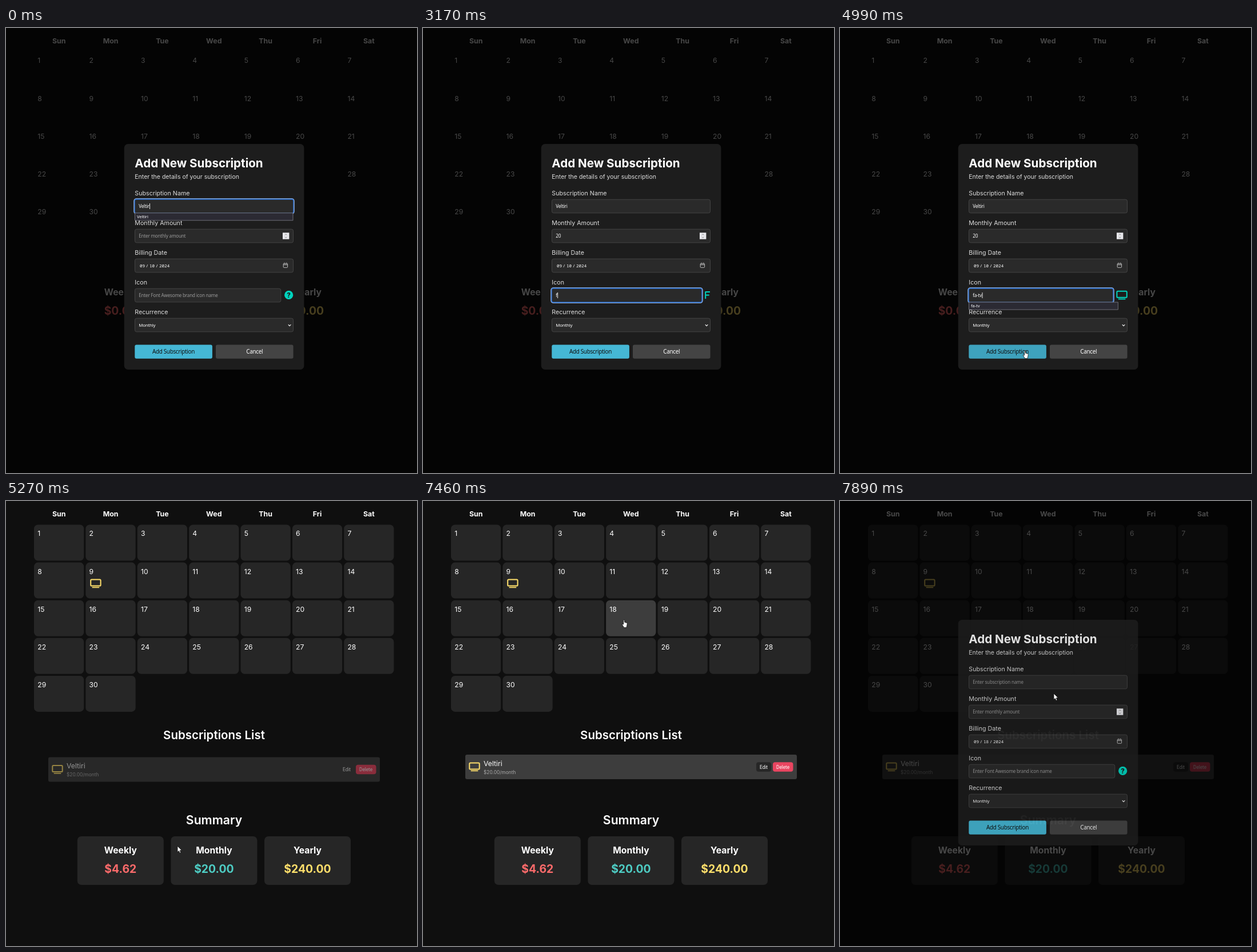
Write an HTML page with a canvas that moves like this. It is 719 px wide and 779 px high and loops after 8000 ms.

```html
<!DOCTYPE html>
<html lang="en">
<head>
<meta charset="utf-8">
<title>Subscription calendar</title>
<style>
html, body { margin: 0; width: 100%; height: 100%; overflow: hidden; background: #0f0f0f; }
canvas { display: block; }
</style>
</head>
<body>
<canvas id="stage" width="719" height="779"></canvas>
<script>
const W = 719, H = 779, LOOP = 8000;
const SERVICE = 'Veltiri';
const UI = 'Inter, sans-serif', FORM = '"Noto Sans", sans-serif';
const TEAL = '#00d4be', YELLOW = '#ffdf6b';
const stage = document.getElementById('stage').getContext('2d');
const layer = document.createElement('canvas');
layer.width = W;
layer.height = H;
let g = stage;

// [time, x, y, shape]; the pointer jumps from one place to the next
const POINTER = [
  [0], [430, 296, 312, 'beam'], [570, 300, 317, 'beam'], [710, 306, 337, 'arrow'],
  [850, 314, 362, 'beam'], [1000, 322, 364, 'beam'], [1140, 330, 340, 'arrow'],
  [1570], [2100, 328, 363, 'beam'], [2230, 324, 388, 'arrow'], [2360, 320, 416, 'beam'],
  [2500, 318, 440, 'arrow'], [2630, 317, 466, 'beam'], [2760, 320, 479, 'arrow'],
  [3170], [4300, 322, 481, 'arrow'], [4440, 322, 492, 'arrow'], [4580, 323, 512, 'arrow'],
  [4720, 324, 540, 'arrow'], [4850, 324, 560, 'hand'], [4990, 320, 564, 'hand'],
  [5120, 312, 585, 'arrow'], [5270, 300, 604, 'arrow'], [5390, 302, 608, 'arrow'],
  [5530, 306, 596, 'arrow'], [5670, 309, 584, 'arrow'], [5820, 311, 574, 'arrow'],
  [5960, 312, 569, 'arrow'], [6360, 318, 556, 'arrow'], [6490, 325, 541, 'arrow'],
  [6770, 325, 470, 'arrow'], [6910, 326, 340, 'arrow'], [7040, 304, 205, 'hand'],
  [7180, 296, 148, 'hand'], [7320, 338, 165, 'hand'], [7460, 348, 207, 'hand'],
  [7740, 356, 245, 'arrow'], [7890, 374, 337, 'arrow']
];
const NAME = [[0, SERVICE.slice(0, 6)], [150, SERVICE]];
const AMOUNT = [[0, ''], [1570, '2'], [1700, '20']];
const ICON = [[0, ''], [3170, 'f'], [3300, 'fa'], [3440, 'fa-'], [3870, 'fa-t'], [4020, 'fa-tv']];
const FOCUS = [[0, 'name'], [1000, 'amount'], [2760, 'icon']];
// [time, opacity, downward offset]
const MODAL = [[0, 1, 0], [5120, 0.45, 8], [5270, 0, 0], [7740, 0.4, 10], [7890, 0.88, 5]];
const ITEM = [[0, 0, 0], [5120, 0.15, 9], [5270, 0.56, 4.5], [5390, 0.85, 1.5], [5530, 1, 0]];

function at(steps, t) {
  let found = steps[0];
  for (const s of steps) if (s[0] <= t) found = s;
  return found;
}

function text(s, x, y, size, color, { weight = 400, font = UI, align = 'left', track = 0 } = {}) {
  g.font = `${weight} ${size}px ${font}`;
  g.textAlign = align;
  g.letterSpacing = track + 'px';
  g.fillStyle = color;
  g.fillText(s, x, y);
  return g.measureText(s).width;
}

function box(x, y, w, h, r, fill, stroke, line = 1) {
  g.beginPath();
  g.roundRect(x, y, w, h, r);
  if (fill) { g.fillStyle = fill; g.fill(); }
  if (stroke) { g.strokeStyle = stroke; g.lineWidth = line; g.stroke(); }
}

function path(points, color, line, fill) {
  g.beginPath();
  points.forEach(([x, y]) => g.lineTo(x, y));
  g.lineJoin = 'round';
  if (fill) { g.closePath(); g.fillStyle = fill; g.fill(); }
  g.strokeStyle = color;
  g.lineWidth = line;
  g.stroke();
}

// Draw a group on the spare layer, then blend it in one go
function group(alpha, dy, draw) {
  if (!alpha) return;
  g = layer.getContext('2d');
  g.clearRect(0, 0, W, H);
  g.save();
  g.translate(0, dy);
  draw();
  g.restore();
  g = stage;
  g.globalAlpha = alpha;
  g.drawImage(layer, 0, 0);
  g.globalAlpha = 1;
}

function tv(x, y, color) {
  box(x + 1, y + 1, 17.4, 11, 1.6, null, color, 2);
  path([[x + 3.4, y + 14.7], [x + 16, y + 14.7]], color, 1.8);
}

function calendar(t, filled, pointer) {
  const [, px, py] = pointer;
  ['Sun', 'Mon', 'Tue', 'Wed', 'Thu', 'Fri', 'Sat'].forEach((d, i) =>
    text(d, 92.7 + i * 90.37, 27.3, 12.4, '#fff', { weight: 700, align: 'center' }));
  for (let i = 0; i < 30; i++) {
    const x = 49 + (i % 7) * 90.37, y = 41.5 + Math.floor(i / 7) * 66.1;
    const hover = t > 5270 && t < 7890 && px >= x && px < x + 87.3 && py >= y && py < y + 63;
    if (filled) box(x, y, 87.3, 63, 7, hover ? '#3d3d3d' : '#262626');
    text(i + 1, x + 6.2, y + 19.9, 12.2, '#fff');
  }
  if (filled) tv(147.2, 136.6, YELLOW);
}

function item(solid) {
  box(74, 444, 580, 43, 3, '#3d3d3d');
  tv(80.3, 457.6, YELLOW);
  text(SERVICE, 106, 463.7, 12.2, '#fff');
  text('$20.00/month', 106, 477.6, 8.4, '#aaa');
  const label = { font: 'Roboto, sans-serif', align: 'center' };
  if (solid) box(583, 457.3, 26, 16.5, 4, '#262626');
  text('Edit', 596, 468.5, 8.2, '#fff', label);
  box(612, 457.3, 35.5, 16.5, 4, '#e94560');
  text('Delete', 629.6, 468.5, 8.2, '#fff', label);
}

function summary(filled) {
  const dy = filled ? 0 : -149;
  const sums = filled ? ['$4.62', '$20.00', '$240.00'] : Array(3).fill('$0.00');
  const bold = { weight: 700, align: 'center' };
  text('Summary', 364, 566.3 + dy, 21.2, '#fff', { weight: 600, align: 'center' });
  ['Weekly', 'Monthly', 'Yearly'].forEach((name, i) => {
    const x = 124.8 + i * 163.6;
    if (filled) box(x, 587, 151, 85, 7, '#262626');
    text(name, x + 75.5, 616.8 + dy, 15.7, '#fff', bold);
    text(sums[i], x + 75.5, 651.3 + dy, 19.4, ['#ff6b6b', '#4ecdc4', YELLOW][i], bold);
  });
}

function field(cy, right, value, hint, focused) {
  box(225.5, cy - 11.8, right - 225.5, 23.6, 3, '#2a2a2a', '#444');
  if (focused) {
    box(225, cy - 12.2, right - 224.5, 24.4, 3, null, '#1766d8', 1.4);
    box(223.9, cy - 13.3, right - 222.3, 26.6, 4, null, '#a9cbff', 1.1);
  }
  const w = text(value || hint, 232.2, cy + 2.9, 8.1, value ? '#fff' : '#9a9a9a', { font: FORM, track: -0.2 });
  if (focused && value) {
    g.fillStyle = '#fff';
    g.fillRect(232.6 + w, cy - 5, 0.9, 10);
  }
}

function suggestions(y, right, rows) {
  box(225.5, y, right - 225.5, 13 * rows.length, 0, '#2b2a33', '#77767f', 0.9);
  rows.forEach((s, i) => text(s, 229, y + 9.4 + i * 13, 7.6, '#fbfbfe', { font: FORM, track: -0.1 }));
}

function iconPreview(name) {
  if (name === 'fa-tv') return tv(483.4, 459.8, TEAL);
  if (name === 'f') {
    path([[502, 462], [494.2, 462], [494.2, 474]], TEAL, 2);
    return path([[494.2, 467.6], [500.6, 467.6]], TEAL, 2);
  }
  if (name) return;
  g.beginPath();
  g.arc(494.7, 467.4, 7.6, 0, 7);
  g.fillStyle = TEAL;
  g.fill();
  text('?', 494.7, 471.6, 11.5, '#1c1c1c', { weight: 800, align: 'center' });
}

function modal(t, hover) {
  const again = t >= 7740;
  const name = again ? '' : at(NAME, t)[1];
  const amount = again ? '' : at(AMOUNT, t)[1];
  const icon = again ? '' : at(ICON, t)[1];
  const focus = again ? '' : at(FOCUS, t)[1];

  box(206.8, 203, 314.6, 395, 6.5, '#1d1d1d');
  text('Add New Subscription', 225.3, 244.3, 20.6, '#fff', { weight: 700 });
  text('Enter the details of your subscription', 225.3, 264, 10.5, '#ddd');
  ['Subscription Name', 'Monthly Amount', 'Billing Date', 'Icon', 'Recurrence'].forEach((s, i) =>
    text(s, 225.3, 292.6 + i * 52.1, 10.7, '#ddd'));

  field(312, 502.5, name, 'Enter subscription name', focus === 'name');
  field(364, 502.5, amount, 'Enter monthly amount', focus === 'amount');
  box(484, 358.3, 11.4, 11.4, 0, '#e9e9ed');
  path([[487.8, 362.6], [489.7, 360.8], [491.6, 362.6]], '#777', 0.9);
  path([[487.8, 365.6], [489.7, 367.4], [491.6, 365.6]], '#777', 0.9);

  field(416, 502.5, '', '', false);
  const mono = { font: '"Noto Sans Mono", monospace', weight: 500 };
  [['09', 234], ['/', 244.6], [again ? '18' : '10', 251], ['/', 261.8], ['2024', 268]].forEach(([s, x]) =>
    text(s, x, 418.8, 7.6, '#fff', mono));
  box(485.2, 412.3, 7.4, 7, 1, null, '#ccc', 0.9);
  path([[485.2, 414.4], [492.6, 414.4]], '#ccc', 1);
  path([[487, 410.8], [487, 412.5]], '#ccc', 0.9);
  path([[490.8, 410.8], [490.8, 412.5]], '#ccc', 0.9);

  const iconRight = icon === 'fa-tv' ? 477.5 : icon === 'f' ? 487.5 : icon ? 496 : 480.8;
  field(468, iconRight, icon, 'Enter Font Awesome brand icon name', focus === 'icon');
  iconPreview(icon);

  field(520, 502.5, '', '', false);
  text('Monthly', 232.2, 522.9, 7.9, '#fff', { font: FORM, track: -0.2 });
  path([[493.8, 519.2], [496.1, 521.6], [498.4, 519.2]], '#fff', 1.1);

  const label = { font: FORM, align: 'center', track: -0.3 };
  box(225.3, 554.5, 135.6, 24.3, 3, hover ? '#3ea2bd' : '#45b7d5');
  text('Add Subscription', 293, 570.4, 9.9, '#101010', label);
  box(367, 554.5, 135.6, 24.3, 3, '#444');
  text('Cancel', 434.7, 570.4, 9.9, '#fff', label);

  if (t < 430) suggestions(323.8, 502, [SERVICE]);
  if (!again && t >= 3300) suggestions(480, 486.4, t < 3870 ? ['fa-tv', 'fa-film'] : ['fa-tv']);
}

const ARROW = [[0, 0], [0, 10.6], [2.4, 8.5], [4.1, 12.3], [5.9, 11.5], [4.3, 7.8], [7.5, 7.6]];
const HAND = [[2.8, 1], [4.5, 1], [4.8, 5.2], [8.6, 6.3], [9.3, 7.5], [8.7, 11.5], [7.8, 14.6],
  [3.6, 14.6], [0.6, 9.6], [0.5, 8], [2.7, 9]];

function drawPointer([, x, y, shape]) {
  if (!shape) return;
  g.save();
  g.translate(x, y);
  if (shape === 'beam') {
    path([[0, -5], [0, 5]], '#fff', 1);
    path([[-2, -5.2], [2, -5.2]], '#fff', 1);
    path([[-2, 5.2], [2, 5.2]], '#fff', 1);
  } else {
    path(shape === 'hand' ? HAND : ARROW, '#111', 0.8, '#fff');
  }
  g.restore();
}

function draw(t) {
  const filled = t >= 5120;
  const pointer = at(POINTER, t);
  const [, shown, drop] = at(MODAL, t);
  const [, itemAlpha, itemDrop] = at(ITEM, t);
  g.fillStyle = '#0f0f0f';
  g.fillRect(0, 0, W, H);
  calendar(t, filled, pointer);
  summary(filled);
  if (filled) {
    text('Subscriptions List', 364, 417.2, 20.5, '#fff', { weight: 600, align: 'center' });
    group(itemAlpha, itemDrop, () => item(itemAlpha > 0.8));
  }
  if (shown) {
    g.fillStyle = `rgba(0,0,0,${0.72 * Math.min(1, shown * 1.13)})`;
    g.fillRect(0, 0, W, H);
    group(shown, drop, () => modal(t, pointer[3] === 'hand'));
  }
  drawPointer(pointer);
}

const start = performance.now();
function tick() {
  draw((performance.now() - start) % LOOP);
  requestAnimationFrame(tick);
}
tick();
</script>
</body>
</html>
```
